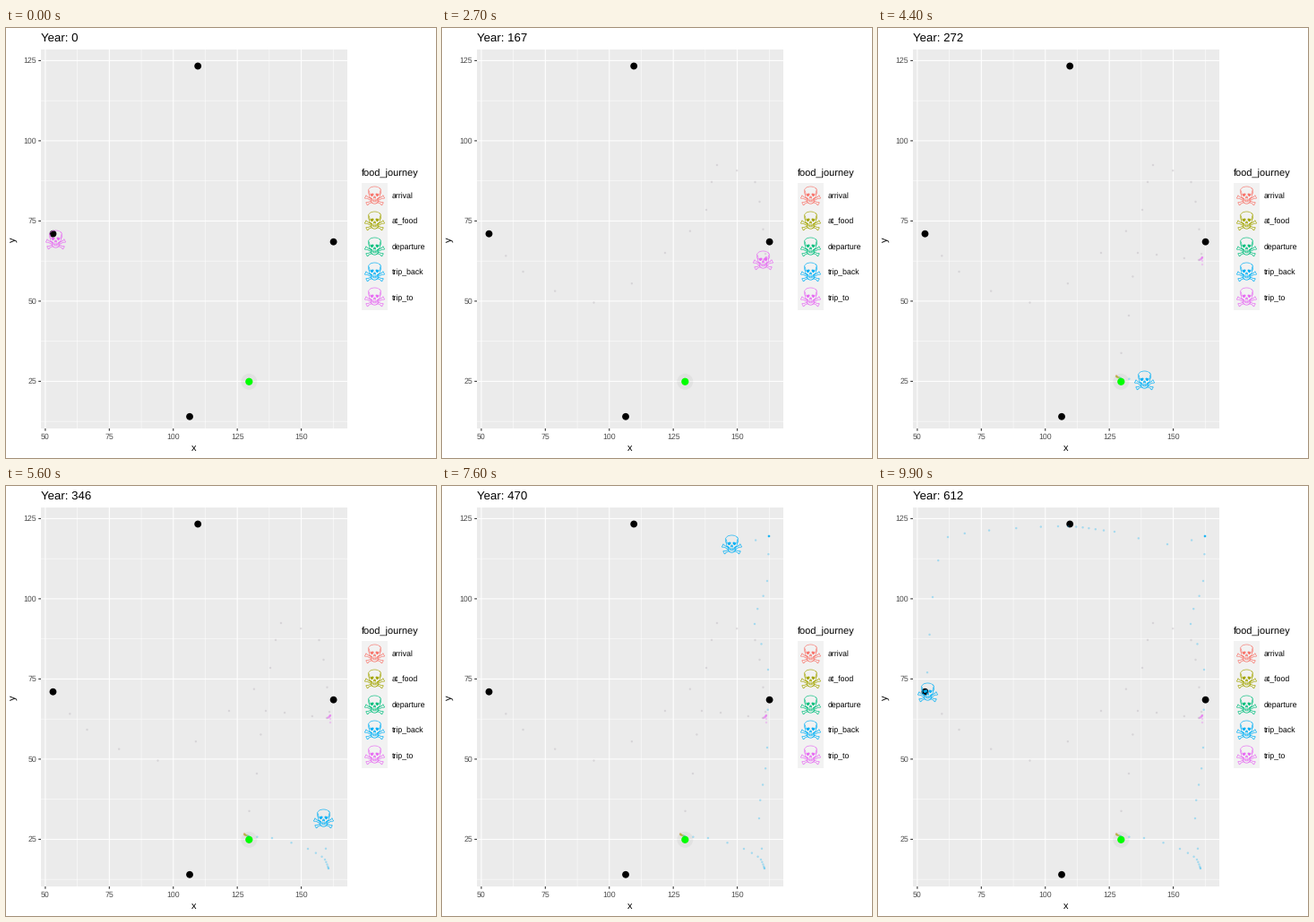
Animation, 480 px wide and 480 px high, one loop 10000 ms. Source, as a matplotlib script:

```python
import numpy as np
import matplotlib.pyplot as plt
from matplotlib.animation import FuncAnimation
from matplotlib.colors import to_rgba
from matplotlib.patches import Circle, PathPatch, Rectangle
from matplotlib.textpath import TextPath
from matplotlib.transforms import Affine2D

SIZE, DPI = 480, 100
FRAMES, INTERVAL, LAST_YEAR = 100, 100, 612
PX = 72 / DPI

STATES = {
    "arrival": "#F8766D",
    "at_food": "#A3A500",
    "departure": "#00BF7D",
    "trip_back": "#00B0F6",
    "trip_to": "#E76BF3",
}
JOURNEY = ["trip_to", "arrival", "at_food", "departure", "trip_back"]
SWITCHES = [34, 35, 41, 43]

# Key poses of the walker: step, x, y
KEYS = np.array([
    (0, 55.5, 236.5), (2, 90.5, 272), (4, 169.5, 306.5), (6, 249, 251),
    (8, 295, 203), (10, 307, 153), (12, 349.5, 172), (16, 362, 264),
    (18, 362, 256), (27, 358, 259), (30, 290, 251), (32, 280, 321),
    (34, 266, 388), (42, 271, 391), (44, 297, 393), (46, 337, 405),
    (49, 356, 417), (54, 360, 427), (56, 354, 371), (60, 363, 292),
    (62, 364, 205), (64, 349, 154), (67, 363, 106), (69, 365, 56),
    (74, 365, 56), (76, 323, 65), (78, 264, 51), (85, 201, 45),
    (90, 78, 57), (92, 61, 124), (95, 54, 228), (99, 55, 230),
])

plt.rcParams.update({"font.family": "Liberation Sans",
                     "text.hinting": "none"})
fig = plt.figure(figsize=(SIZE / DPI, SIZE / DPI), dpi=DPI, facecolor="white")
ax = fig.add_axes([0, 0, 1, 1])
ax.set(xlim=(0, SIZE), ylim=(SIZE, 0))
ax.axis("off")


def glide(t, v, at):
    """Smooth interpolation that never overshoots its key values."""
    h = np.diff(t)
    s = np.diff(v) / h
    same = s[:-1] * s[1:] > 0
    m = np.zeros(len(v))
    m[1:-1][same] = (2 * s[:-1] * s[1:])[same] / (s[:-1] + s[1:])[same]
    m[0], m[-1] = s[0], s[-1]
    k = np.clip(np.searchsorted(t, at, side="right") - 1, 0, len(h) - 1)
    u = (at - t[k]) / h[k]
    ease = u * u * (3 - 2 * u)
    return (v[k] + (v[k + 1] - v[k]) * ease
            + h[k] * u * (1 - u) * (m[k] * (1 - u) - m[k + 1] * u))


def px_x(v):
    return 43.9 + (v - 50) * 2.857


def px_y(v):
    return 36.4 + (125 - v) * 3.58


def label(x, y, s, size, color="black", **kw):
    return ax.text(x, y, s, fontsize=size * PX, color=color, **kw)


def line(xs, ys, color, width, z=1):
    ax.plot(xs, ys, color=color, lw=width * PX, zorder=z,
            solid_capstyle="butt", snap=False)


def box(x0, y0, x1, y1, color):
    ax.add_patch(Rectangle((x0, y0), x1 - x0, y1 - y0, fc=color, lw=0))


def dot(x, y, r, color, **kw):
    ax.add_patch(Circle((px_x(x), px_y(y)), r, fc=color, lw=0, zorder=4, **kw))


glyph = TextPath((0, 0), "\u2620", size=29.4, prop={"family": "DejaVu Sans"})
ext = glyph.get_extents()
glyph = Affine2D().translate(-(ext.x0 + ext.x1) / 2,
                             -(ext.y0 + ext.y1) / 2).transform_path(glyph)


def place(patch, x, y):
    # Glyphs sit on whole pixels
    x, y = np.floor(x) + 0.5, np.floor(y) + 0.4
    patch.set_transform(
        Affine2D().scale(1, -1).translate(x, y) + ax.transData)


def skull(x, y, color):
    patch = ax.add_patch(PathPatch(glyph, fc=color, lw=0, zorder=6))
    place(patch, x, y)
    return patch


# Panel, grid and axes
L, T, R, B = 39, 24, 381, 447
box(L, T, R, B, "#EBEBEB")
for k in range(5):
    xm, ym = px_x(62.5 + 25 * k), px_y(12.5 + 25 * k)
    line([xm, xm], [T, B], "white", 0.53)
    line([L, R], [ym, ym], "white", 0.53)
for k in range(5):
    xv, yv = 50 + 25 * k, 25 + 25 * k
    x, y = px_x(xv), px_y(yv)
    line([x, x], [T, B], "white", 1.07, 2)
    line([L, R], [y, y], "white", 1.07, 2)
    line([x, x], [B, B + 2.75], "#333333", 1.07)
    line([L - 2.75, L], [y, y], "#333333", 1.07)
    label(x, 459.4, str(xv), 8.8, "#4D4D4D", ha="center")
    label(34, y + 3, str(yv), 8.8, "#4D4D4D", ha="right")

title = label(39, 14.6, "", 13.2)
label(210, 472, "x", 11, ha="center")
label(14.2, 235.8, "y", 11, rotation=90, ha="right", va="center")

# Legend
KEY = 28.45
label(397, 166, "food_journey", 11)
box(397, 173, 426, 173 + 5 * KEY, "#F2F2F2")
for k, (name, color) in enumerate(STATES.items()):
    skull(411.5, 187.15 + KEY * k, color)
    label(431, np.floor(190.2 + KEY * k), name, 8.8)

# Landmarks
for x, y in [(109.6, 123.3), (53, 71), (162.6, 68.5), (106.4, 14)]:
    dot(x, y, 3.9, "black")
dot(129.6, 24.9, 9, "black", alpha=0.04)
dot(129.6, 24.9, 4.1, "#00FF00")

# Route, one position per step
steps = np.arange(FRAMES)
route = np.column_stack([glide(KEYS[:, 0], KEYS[:, c], steps)
                         for c in (1, 2)])
stages = [JOURNEY[n] for n in np.searchsorted(SWITCHES, steps, side="right")]
speed = np.hypot(*np.gradient(route, axis=0).T)


def trail_color(stage, pace):
    faint = stage == "trip_to" and pace > 5
    return to_rgba("#A8A0AA" if faint else STATES[stage], 0.3)


trail_colors = [trail_color(*sp) for sp in zip(stages, speed)]
trail = ax.scatter([], [], s=3, linewidths=0, zorder=5)
walker = skull(*route[0], STATES["trip_to"])


def update(i):
    title.set_text(f"Year: {round(LAST_YEAR * i / (FRAMES - 1))}")
    trail.set_offsets(route[1:max(i, 1)])
    trail.set_facecolors(trail_colors[1:max(i, 1)])
    place(walker, *route[i])
    walker.set_facecolor(STATES[stages[i]])
    return title, trail, walker


anim = FuncAnimation(fig, update, frames=FRAMES, interval=INTERVAL,
                     repeat=True, repeat_delay=0)
plt.show()
```
